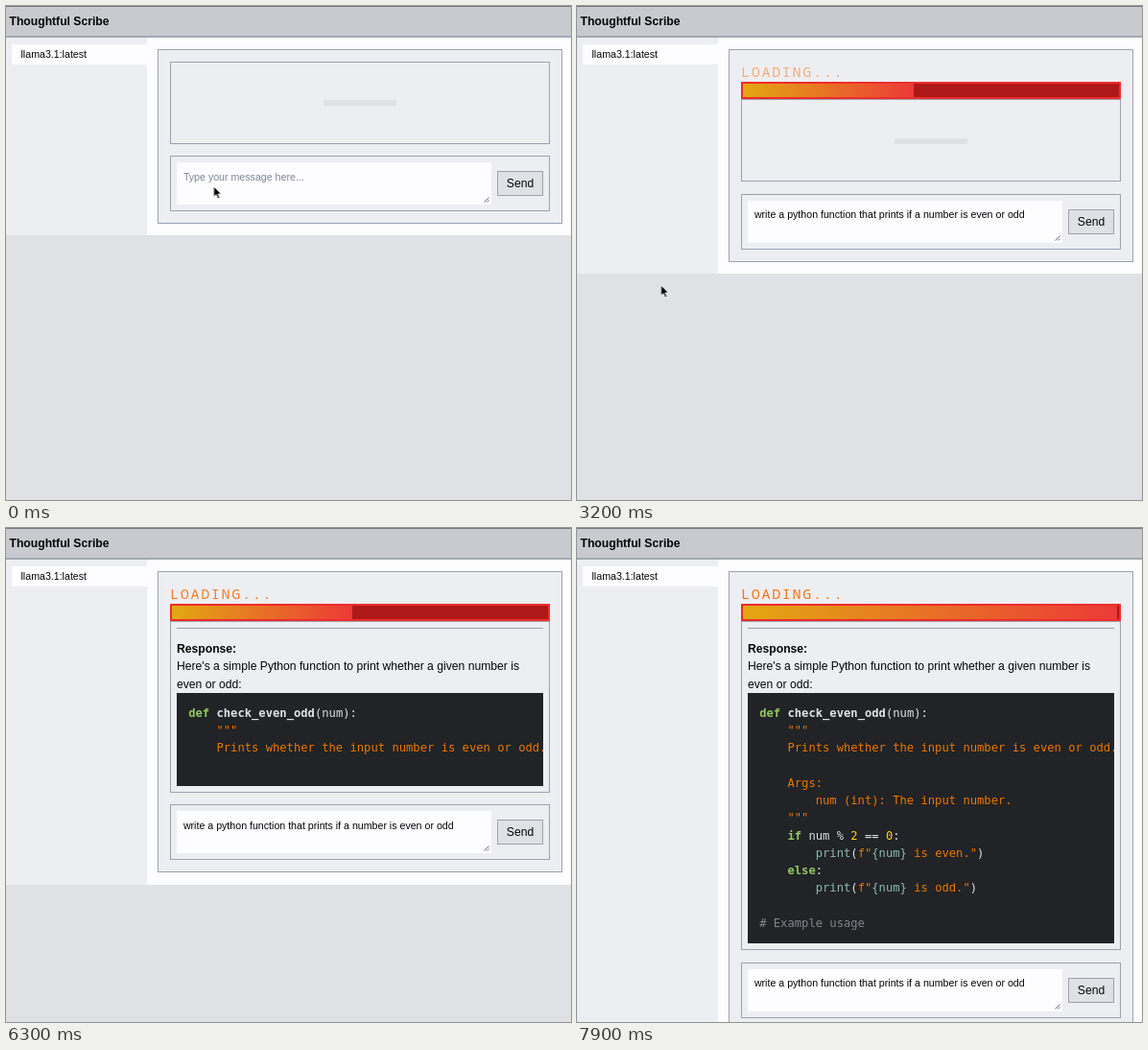
Animation of 589 by 515 pixels, one loop 8000 ms. Source, as an HTML page:

```html
<!DOCTYPE html>
<html lang="en">
<head>
<meta charset="utf-8">
<title>Prompt demo</title>
<style>
:root {
  --t: 0;
  --line: #9ca2ad;
  --panel: #edeef2;
  --paper: #fdfcfe;
  --mid: #dfe1e5;
  --dark: #c8cad0;
}
* { box-sizing: border-box; }
html, body { margin: 0; width: 589px; height: 515px; overflow: hidden; }
body {
  position: relative;
  background: var(--mid);
  color: #050505;
  font: 12.17px/18.25px "Liberation Sans", Arial, sans-serif;
}
header {
  height: 33px;
  padding-left: 3.5px;
  border-top: 1px solid #777a82;
  border-bottom: 2px solid #a3a8b3;
  background: var(--dark);
  font-weight: bold;
  line-height: 30px;
}
.page { display: flex; background: var(--paper); }
nav { width: 146.5px; padding: 7px 0 0 6px; background: var(--panel); }
nav div {
  height: 21px;
  padding-left: 9.5px;
  background: var(--paper);
  font-size: 10.64px;
  line-height: 21px;
}
main { padding: 11.7px 0 12.2px 11.5px; }
.box { border: 1px solid var(--line); background: var(--panel); }
.panel { width: 422px; padding: 11.9px 12px 12px; }

.load {
  height: 21.2px;
  color: #f97316;
  font: 15.2px/21.2px "Noto Sans Mono", "DejaVu Sans Mono", monospace;
  letter-spacing: 1.6px;
  white-space: pre;
  animation: pulse 2s cubic-bezier(.4, 0, .6, 1) infinite paused;
}
.bar { height: 18.3px; border: 2px solid #ee2c2c; background: #af1818; }
.fill {
  height: 100%;
  background: linear-gradient(90deg, #e3a812, #ec3a38);
  animation: fill 3s ease-in-out infinite paused;
}
.load, .fill { animation-delay: calc(2.015s - var(--t) * 1s); }
@keyframes pulse { 50% { opacity: .5; } }
@keyframes fill {
  0% { width: 0; }
  50% { width: 50%; }
  100% { width: 100%; }
}

.chat { padding: 6px; }
.chat.empty { height: 86.3px; padding-top: 39.5px; }
.blank { width: 76px; height: 6px; margin: 0 auto; background: var(--mid); }
hr { height: 1px; margin: 0 0 12px; border: 0; background: var(--line); }
pre {
  margin: 0;
  padding: 12.17px;
  overflow: hidden;
  background: #212326;
  color: #e0e2e4;
  font: 12.17px/18.25px "DejaVu Sans Mono", monospace;
}
.k { color: #93c763; font-weight: bold; }
.f { font-weight: bold; }
.s { color: #ec7600; }
.n { color: #ffcd22; }
.b { color: #8cbbad; }
.c { color: #81878d; }

.ask { display: flex; align-items: center; gap: 6px; height: 58px; margin-top: 12.2px; padding: 0 6px; }
.field {
  position: relative;
  width: 328px;
  height: 44px;
  padding: 5.9px;
  border: 1px solid var(--paper);
  background: var(--paper);
  font-size: 10.64px;
  line-height: 16px;
  white-space: nowrap;
}
.field.focus { border-color: #62656c; }
.field svg { position: absolute; right: 1px; bottom: 1px; }
.hint { color: #7d8596; }
.caret { position: absolute; top: 7px; width: 1px; height: 13px; background: #111; }
.send {
  width: 48px;
  height: 26px;
  border: 1px solid var(--line);
  background: var(--mid);
  line-height: 24px;
  text-align: center;
}
.send.hover { background: var(--dark); }

.cursor {
  position: absolute;
  left: -1px;
  top: -1px;
  animation: move 8s ease-in-out infinite paused, show 8s step-end infinite paused;
  animation-delay: calc(var(--t) * -1s);
}
@keyframes move {
  0%, 2% { transform: translate(216.5px, 188px); }
  13.74% { transform: translate(330px, 184px); }
  18.5%, 25.5% { transform: translate(532.5px, 184px); }
  35.5%, 100% { transform: translate(87.5px, 291px); }
}
@keyframes show {
  0%, 13.75% { opacity: 1; }
  1.25%, 70%, 100% { opacity: 0; }
}
[hidden] { display: none; }
</style>
</head>
<body>
<header>Thoughtful Scribe</header>
<div class="page">
  <nav><div>llama3.1:latest</div></nav>
  <main>
    <div class="box panel">
      <div id="loading">
        <div class="load">LOADING...</div>
        <div class="bar"><div class="fill"></div></div>
      </div>
      <div class="box chat" id="chat">
        <div class="blank" id="blank"></div>
        <div id="reply"><hr><b>Response:</b><div id="intro"></div><pre id="code"></pre></div>
      </div>
      <div class="box ask">
        <div class="field" id="field"><span id="typed">write a python function that prints if a number is even or odd</span><i class="caret" id="caret"></i><span class="hint" id="hint">Type your message here...</span>
          <svg width="6" height="6" stroke="#666" stroke-width=".9"><path d="M.5 5.5l5-5M3.5 5.5l2-2"/></svg>
        </div>
        <div class="send" id="send">Send</div>
      </div>
    </div>
  </main>
</div>
<svg class="cursor" width="11" height="16" viewBox="-1 -1 11 16">
  <path d="M0 0V11.2L2.6 8.8L4.4 13L6.4 12.1L4.6 8H8.1Z" stroke="#fff" stroke-width=".9"/>
</svg>
<script>
const $ = id => document.getElementById(id);
const LOOP = 8000, SENT = 2015;

const intro = "Here's a simple Python function to print whether a given number is even or odd:";
const code = [
  ["k", "def"], ["", " "], ["f", "check_even_odd"], ["", "(num):\n"],
  ["s", '    """\n    Prints whether the input number is even or odd.\n\n    Args:\n        num (int): The input number.\n    """\n'],
  ["k", "    if"], ["", " num % "], ["n", "2"], ["", " == "], ["n", "0"], ["", ":\n"],
  ["b", "        print"], ["", "("], ["s", 'f"'], ["b", "{num}"], ["s", ' is even."'], ["", ")\n"],
  ["k", "    else"], ["", ":\n"],
  ["b", "        print"], ["", "("], ["s", 'f"'], ["b", "{num}"], ["s", ' is odd."'], ["", ")\n\n"],
  ["c", "# Example usage"]
];
const spans = code.map(([kind, text]) => {
  const span = document.createElement("span");
  span.className = kind;
  $("code").append(span);
  return [span, text];
});

// Character offset after each streamed token
const full = intro + "\n" + code.map(part => part[1]).join("");
const ends = [0];
for (const m of full.matchAll(/ *(\w+|[^\w\s]+)\n*/g)) ends.push(m.index + m[0].length);

const tokensTo = text => ends.indexOf(full.indexOf(text) + text.length);
const pace = [
  [5050, 0],
  [6300, tokensTo("odd.\n\n")],
  [7100, tokensTo("0:\n")],
  [7900, ends.length - 1]
];

function streamed(t) {
  if (t < pace[0][0]) return 0;
  for (let i = 1; i < pace.length; i++) {
    const [t0, n0] = pace[i - 1], [t1, n1] = pace[i];
    if (t < t1) return ends[Math.floor(n0 + (n1 - n0) * (t - t0) / (t1 - t0))];
  }
  return full.length;
}

const within = (t, from, to) => t >= from && t < to;

function draw(t) {
  document.documentElement.style.setProperty("--t", t / 1000);

  $("typed").hidden = t < 1100;
  $("hint").hidden = t >= 1100;
  $("caret").hidden = !(within(t, 100, 700) || within(t, 1100, 1600));
  $("field").classList.toggle("focus", within(t, 100, SENT));
  $("send").classList.toggle("hover", within(t, 1400, SENT));
  $("loading").hidden = t < SENT;

  const shown = streamed(t);
  $("chat").classList.toggle("empty", !shown);
  $("blank").hidden = shown > 0;
  $("reply").hidden = !shown;
  $("intro").textContent = intro.slice(0, shown);

  let left = Math.max(0, shown - intro.length - 1);
  $("code").hidden = !left;
  for (const [span, text] of spans) {
    span.textContent = text.slice(0, Math.max(0, left));
    left -= text.length;
  }
}

const start = performance.now();
function tick() {
  draw((performance.now() - start) % LOOP);
  requestAnimationFrame(tick);
}
draw(0);
requestAnimationFrame(tick);
</script>
</body>
</html>
```
